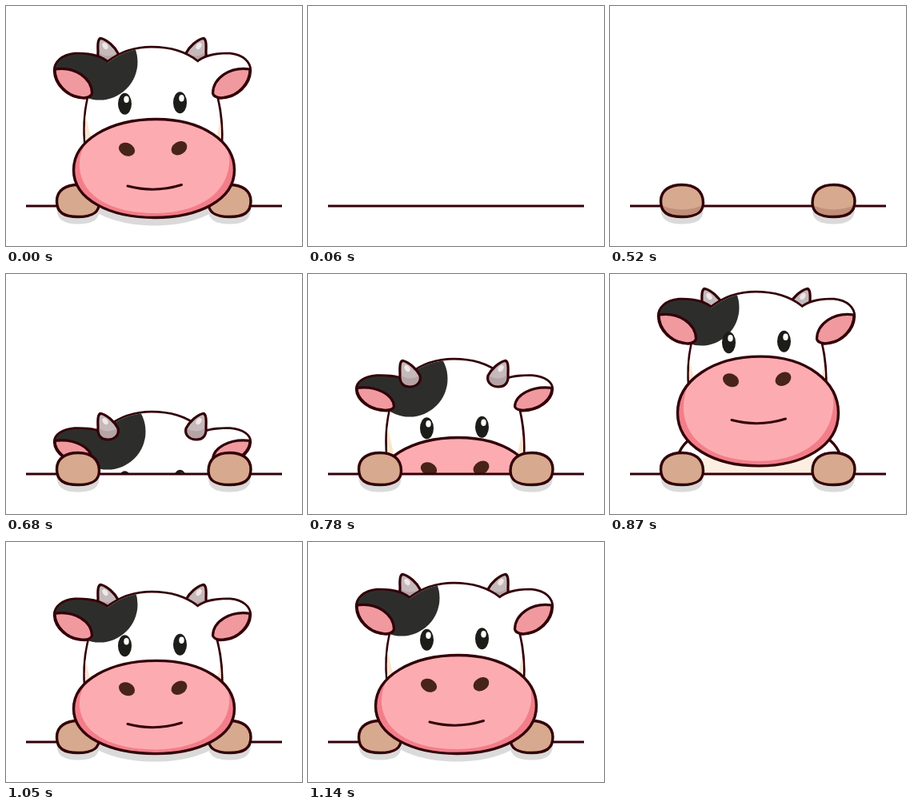
An HTML page with a canvas that plays this animation: 370 px wide and 300 px high, repeating every 1.9 s.

```html
<!DOCTYPE html>
<html lang="en">
<head>
<meta charset="utf-8">
<title>Peeking cow</title>
<style>
  html, body { margin: 0; width: 100%; height: 100%; overflow: hidden; background: #fff; }
  canvas { display: block; width: 370px; height: 300px; }
</style>
</head>
<body>
<canvas id="stage"></canvas>
<script>
const W = 370, H = 300, LOOP = 1900, LEDGE = 250;
const INK = '#320008', BLACK = '#2d2e2b', PINK = '#f09a9f', CREAM = '#fbe5cf';

const canvas = document.getElementById('stage');
const ctx = canvas.getContext('2d');
const ratio = window.devicePixelRatio || 1;
canvas.width = W * ratio;
canvas.height = H * ratio;
ctx.scale(ratio, ratio);
ctx.lineCap = ctx.lineJoin = 'round';

// Outlines: absolute x, y measured from the top of each part.
const SHAPES = {
  head: 'M104 152 L100 125 C96 85 103 40 127 20 C145 6 163 1.5 182 1.5 C205 1.5 224 7 239 19 C262 36 271 85 268.5 125 L266 152Z',
  cheek: 'M95 68 Q104 100 112 145 L95 145Z',
  ear: 'M128 14 C118 4 100 2 86 2.5 C70 4 61.5 13 61.5 23 C62 40 78 56 98 56 C104 56 107 54 107 50Z',
  lobe: 'M61 21 C86 17 107 32 107.5 51 C106 57 97 57.5 92 56 C75 54 61 38 61 21Z',
  horn: 'M119 1.5 C115 1 114.5 8 115 18 C114 28 118 34 127 34 C136 34 142 28 140 20 C136 12 126 3 119 1.5Z',
  hornShade: 'M115 18 C120 24 130 26 141 19 L140 36 L114 36Z',
  muzzle: 'M84.5 65 C84.5 28 130 1.5 188 1.5 C246 1.5 285.5 30 285.5 65 C285.5 103 240 124.5 186 124.5 C130 124.5 84.5 102 84.5 65Z',
  glow: 'M92 62 C90 20 130 -6 188 -6 C246 -6 282 20 279 58 C275 98 235 119 186 119 C135 119 95 100 92 62Z',
  body: 'M108 201 C95 208 84 220 82 240 L82 350 L291 350 L291 240 C289 220 278 208 265 201Z',
  hoof: 'M63.5 22 C63.5 8 75 1.5 90 1.5 C106 1.5 116.5 9 116.5 24 C116.5 37 107 41.5 90 41.5 C72 41.5 63.5 36 63.5 22Z'
};

// [time, left hoof top, right hoof top]; null is hidden
const HOOVES = [
  [0, 222, 222], [60, null, null],
  [220, null, 235], [280, null, 215], [340, null, 222],
  [400, 235, 222], [460, 215, 222], [520, 222, 222]
];

// [time, head, ear, ear scale, horn, patch x, patch y, eyes, muzzle top, muzzle bottom, nose, mouth]
const REST = [51, 58, 1, 39, 117, 70, 121.5, 140, 266, 178.5, 225];
const COW = [
  [0, ...REST], [60],
  [680, 172, 192, .78, 173, 127, 197, 259, 271, 397, 311, 355],
  [780, 106, 126, .78, 107, 127, 131, 192, 203, 330, 243, 288],
  [810, 62, 75, .9, 60, 120, 84, 137, 152, 285, 188, 234],
  [870, 22, 30, 1, 17, 114, 42, 85, 101.5, 241.5, 132, 182.5],
  [930, 34, 42, 1, 27, 115, 53, 100, 117, 253, 150, 199],
  [990, 55, 62, .95, 45, 117, 72, 123, 141, 264, 178, 223],
  [1050, 62, 70, .92, 52, 117, 78, 129, 147, 266, 183, 227.5],
  [1110, 55, 62, .97, 43, 117, 73, 124, 142, 266, 180, 226],
  [1140, ...REST]
];

const at = (table, t) => table.findLast(row => row[0] <= t);

function place(name, y, sy = 1, mirror = 0) {
  const path = new Path2D();
  path.addPath(new Path2D(SHAPES[name]), new DOMMatrix([mirror ? -1 : 1, 0, 0, sy, mirror, y]));
  return path;
}

function fill(path, color) {
  ctx.fillStyle = color;
  ctx.fill(path);
}

function stroke(path, width = 3.2) {
  ctx.strokeStyle = INK;
  ctx.lineWidth = width;
  ctx.stroke(path);
}

function within(path, draw) {
  ctx.save();
  ctx.clip(path);
  draw();
  ctx.restore();
}

function box(x, y, w, h) {
  const path = new Path2D();
  path.rect(x, y, w, h);
  return path;
}

function oval(x, y, rx, ry, color, turn = 0) {
  ctx.beginPath();
  ctx.ellipse(x, y, rx, ry, turn, 0, Math.PI * 2);
  ctx.fillStyle = color;
  ctx.fill();
}

const ABOVE = box(0, 0, W, LEDGE), BELOW = box(0, LEDGE, W, H - LEDGE);

function drawHoof(y, mirror, lit) {
  const path = place('hoof', y, 1, mirror);
  const cx = mirror ? mirror - 90 : 90;
  const paint = () => {
    within(path, () => {
      fill(path, '#c08f79');
      oval(cx, y + 14, 36, lit ? 26 : 18.5, '#d7a98f');
    });
    stroke(path, 3.4);
  };
  if (y > 230) within(ABOVE, paint);
  else paint();
}

function drawHorns(y) {
  for (const mirror of [0, 365]) {
    const path = place('horn', y, 1, mirror);
    within(path, () => {
      fill(path, '#c6b9bb');
      fill(place('hornShade', y, 1, mirror), '#b5a4a6');
      oval(mirror ? mirror - 124 : 124, y + 11, 3, 4.5, '#eee8e9', mirror ? .6 : -.6);
    });
    stroke(path);
  }
}

function drawHead([, top, ear, scale, horn, px, py, eyes]) {
  const head = place('head', top);
  const ears = [0, 366].map(m => place('ear', ear, scale, m));
  const hornsInFront = scale < .85;

  if (!hornsInFront) drawHorns(horn);
  [head, ...ears].forEach(p => stroke(p, 5.4));
  fill(head, '#fff');
  fill(ears[1], '#fff');
  within(head, () => {
    fill(place('cheek', top), CREAM);
    fill(place('cheek', top, 1, 369), CREAM);
    oval(px, py, 47.5, 47.5, BLACK);
  });
  fill(ears[0], BLACK);
  for (const mirror of [0, 366]) {
    const lobe = place('lobe', ear, scale, mirror);
    fill(lobe, PINK);
    stroke(lobe);
  }
  if (hornsInFront) drawHorns(horn);

  for (const [x, y] of [[148.5, eyes + .7], [217.5, eyes - .7]]) {
    oval(x, y, 8.5, 13.5, '#1c1d19');
    oval(x + 2, y - 5.5, 3.2, 4.3, '#fff');
  }
}

function drawMuzzle(pose) {
  const [top, bottom, nose, mouth] = pose.slice(8);
  const scale = (bottom - top) / 126;
  const path = place('muzzle', top, scale);
  within(path, () => {
    fill(path, '#f27e8a');
    fill(place('glow', top, scale), '#fcacb0');
  });
  stroke(path, 3.4);
  oval(151, nose + .7, 10.5, 8, '#482318', .45);
  oval(216.5, nose - .7, 10.5, 8, '#482318', -.55);
  stroke(new Path2D(`M152 ${mouth} Q186 ${mouth + 9} 219.5 ${mouth - 1.5}`), 3);
}

function drawBody(y) {
  const path = place('body', y);
  within(path, () => {
    fill(path, '#fff');
    oval(186, y + 262, 105, 42, '#fcefe1');
  });
  stroke(path);
}

function render(t) {
  const pose = at(COW, t);
  const [, left, right] = at(HOOVES, t);
  const hooves = [[left, 0], [right, 369.5]].filter(([y]) => y !== null);
  const cow = pose.length > 1;
  const inFront = cow && (t < 60 || t >= 930);

  ctx.fillStyle = '#fff';
  ctx.fillRect(0, 0, W, H);

  within(BELOW, () => {
    for (const [y, mirror] of hooves)
      if (y < 230) fill(place('hoof', y + 9, 1, mirror), '#dadada');
    if (inFront) fill(place('muzzle', pose[8] + 10, (pose[9] - pose[8]) / 126), '#dadada');
  });

  if (cow) within(ABOVE, () => {
    drawBody(pose[1] - 22);
    drawHead(pose);
    if (!inFront) drawMuzzle(pose);
  });

  ctx.fillStyle = INK;
  ctx.fillRect(25, LEDGE - 1.5, 320, 3);
  hooves.forEach(([y, mirror]) => drawHoof(y, mirror, cow));
  if (inFront) drawMuzzle(pose);
}

const start = performance.now();
function tick() {
  render((performance.now() - start) % LOOP);
  requestAnimationFrame(tick);
}
tick();
</script>
</body>
</html>
```
